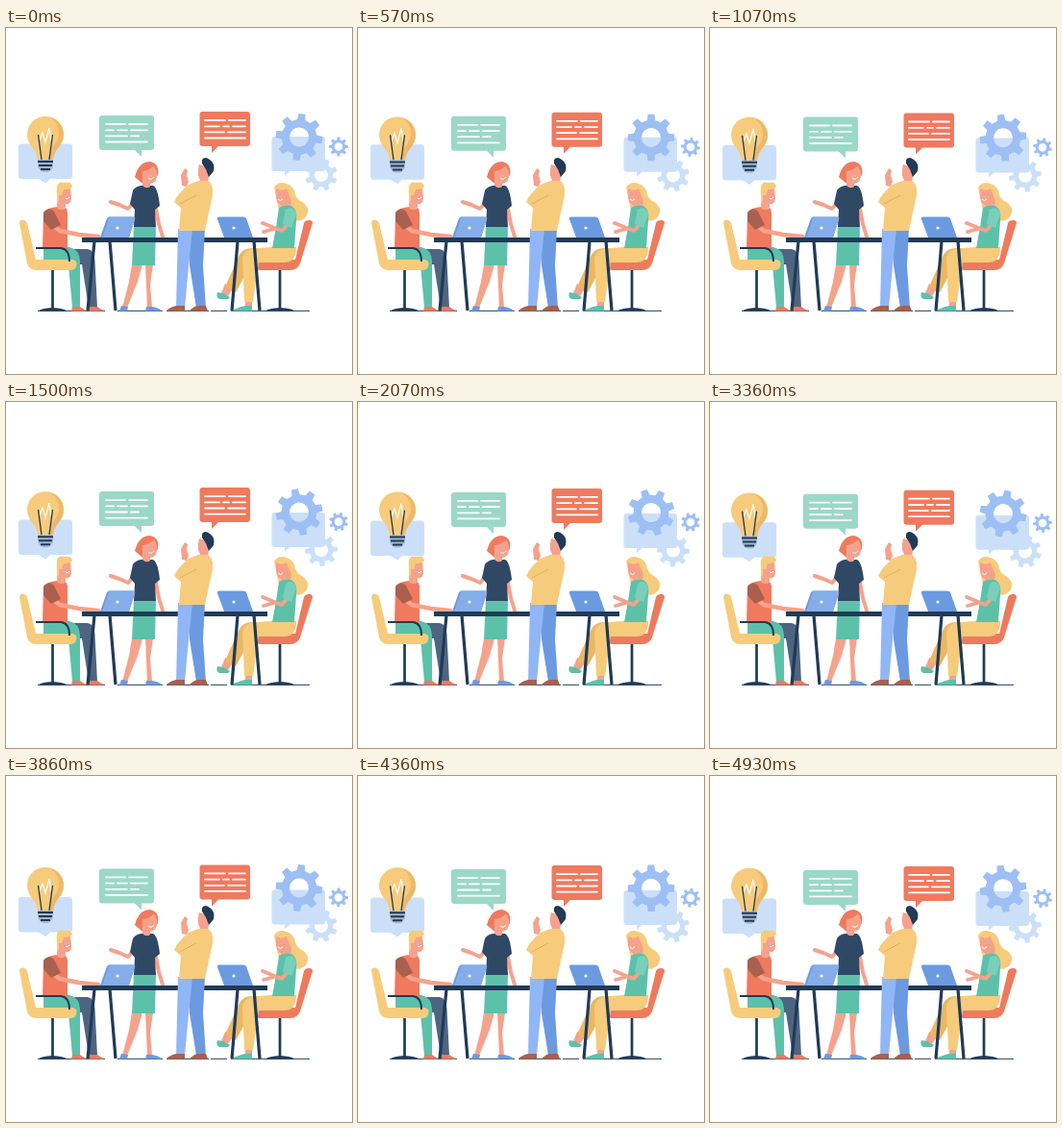
Animation of 360x360 px, one loop 5000 ms. Source, as an HTML page:

```html
<!DOCTYPE html>
<html lang="en">
<head>
<meta charset="utf-8">
<title>Team meeting</title>
<style>
html, body { margin: 0; height: 100%; overflow: hidden; background: #fff }
svg { display: block; width: 100vw; height: 100vh }
.navy { fill: #203a57 } .skin { fill: #f5a28c } .teal { fill: #5dc1aa }
.gold { fill: #f7cb7c } .coral { fill: #ef7a5e } .pale { fill: #cbe0f8 }
.blue { fill: #9dbff4 } .denim { fill: #6c9ae0 } .brown { fill: #a9604f }
.line { fill: none; stroke: #203a57; stroke-width: 2 }
.arm { fill: none; stroke: #f5a28c; stroke-width: 4.6; stroke-linecap: round; stroke-linejoin: round }
.text { fill: none; stroke: #fff; stroke-width: 1.8; stroke-linecap: round }
</style>
</head>
<body>
<svg viewBox="0 0 360 360">
  <g data-drop="7">
    <path class="pale" d="M16 120.500H66q3 0 3 3V154q0 3-3 3H46l-5 4.500-7-4.500H16q-3 0-3-3V123.500q0-3 3-3z"/>
    <path class="pale" d="M279.500 113H329q3 0 3 3V146q0 3-3 3H295l-5 5v-5H279.500q-3 0-3-3V116q0-3 3-3z"/>
    <path fill="#9bd8c5" d="M100 91H151q3 0 3 3V124q0 3-3 3H141V134l-7-7H100q-3 0-3-3V94q0-3 3-3z"/>
    <path class="text" d="M104 100H124M128 100H147M104 106.300H112M116 106.300H126M130 106.300H147M104 112.400H126M130 112.400H138M104 118.500H147"/>
    <path class="coral" d="M204.500 87H251q3 0 3 3V120q0 3-3 3H221L214 130V123H204.500q-3 0-3-3V90q0-3 3-3z"/>
    <path class="text" d="M207 96H228M232 96H249M207 102.300H222M226 102.300H232M236 102.300H249M207 108.400H227M231 108.400H249M207 114.500H249"/>
  </g>

  <g data-drop="3.8">
    <path class="gold" d="M41 92C30 92 22 100 22 111C22 122 32 126 33 137H49C50 126 60 122 60 111C60 100 52 92 41 92z"/>
    <path fill="#edb968" d="M45 92.500C54 95 60 102 60 111C60 122 50 126 49 137H44C45 123 55 121 55 109C55 102 51 96 45 92.500z"/>
    <path d="M35 117L38 109 41 119 45 104 47 117" fill="none" stroke="#fff" stroke-width="1.2"/>
    <path class="line" style="stroke-width:1.300" d="M33.500 111L37 137M48.500 111L45 137"/>
    <path d="M33 137H49V143Q48 149 43 150H39Q34 149 33 143z" fill="#a7b6cb"/>
    <path class="line" d="M33 139H49M34 143H48M36 147H46"/>
    <g id="gears"></g>
  </g>

  <!-- floor and chair stands -->
  <path class="line" style="stroke-width:1" d="M33 294.300H103M116 294.300H163M167 294.300H211M213 294.300H230M234 294.300H316"/>
  <path class="line" style="stroke-width:2.700" d="M48.500 250V292M285 250V292"/>
  <path class="navy" d="M34 294.500Q36 291.500 48 291Q61 291.500 63 294.500zM270 294.500Q273 291.500 285 291Q298 291.500 300 294.500z"/>
  <path class="coral" d="M319 203Q319 199.500 315 200Q311 200 310 203L301 241H263Q257 243 259 248Q260 252 265 252H296Q303 252 306 245z"/>

  <!-- seated man -->
  <path fill="#4d657f" d="M66 230H85Q92 231 92.500 242L95 291H86L79 246H62z"/>
  <path class="teal" d="M39 228H66Q76 230 77 242V291H69L65 246H39z"/>
  <path class="coral" d="M39 192Q42 187 54 186H61Q65 189 64 198V230H38z"/>
  <path class="skin" d="M54 167H67L68 177Q68 184 62 183V188Q56 191 53 187z"/>
  <path class="gold" d="M53 165Q54 159 61 161Q68 159 69 165Q67 168 60 168L58 174H55V182Q52 176 53 165z"/>
  <path d="M62 177Q64 179 66 176" fill="none" stroke="#fff"/>
  <path class="arm" d="M47 204L56 211 76 215 96 217"/>
  <path class="brown" d="M39 192Q45 185 50 191L57 205 47 210 39 201z"/>
  <path class="gold" d="M14 203Q14 199 18 199.500Q21 200 22 203L31 241H70Q75 243 73 248Q72 252 67 252H32Q24 252 22 245z"/>
  <path class="line" d="M31 229H57Q66 230 66 243"/>
  <path class="coral" d="M69 290H77L84 294.500H68zM86 290H95L102 294.500H86z"/>

  <!-- standing woman -->
  <path class="skin" d="M131 246H142L137 264 126 291H121L128 264zM145 246H153L150 267 152 291H147z"/>
  <path class="teal" d="M133 205H156L155 247H131z"/>
  <path class="arm" style="stroke-width:4" d="M156 188L159 204 163 217M134 180L127 188 118 184 109 181"/>
  <path fill="#2f4864" d="M132 169Q136 163 147 164H153Q158 166 160 185L155 189 156 207H133L134 189 129 183z"/>
  <path class="coral" d="M134 155Q138 139 150 139Q160 141 158 153L153 160 141 161z"/>
  <path class="skin" d="M142 149Q150 148 154 143L157 150Q158 161 150 162V165Q146 168 142 164z"/>
  <path d="M148 156Q151 159 154 155" fill="none" stroke="#fff"/>
  <path class="denim" d="M120 289L127 290 126 294.500H118zM146 290H152Q160 291 162 294.500H145z"/>

  <!-- seated woman -->
  <path class="gold" d="M279 166Q283 159 292 162Q300 165 301 173Q302 178 308 181Q317 187 313 195Q308 203 298 200L284 190z"/>
  <path class="skin" d="M281 167Q287 170 292 167L297 180 295 188H286V184Q280 183 281 167z"/>
  <path d="M283 178Q285 181 288 178" fill="none" stroke="#fff"/>
  <path class="skin" d="M228 266L237 270 231 279 224 276zM249 279H256V291H249z"/>
  <path fill="#eab765" d="M264 230L254 248 239 275 228 269 243 236Q247 229 256 229z"/>
  <path class="gold" d="M276 228H302Q302 243 291 244H263L257 285H248L246 240Q248 229 262 229z"/>
  <path class="teal" d="M284 187Q289 184 297 185Q304 190 302 200L300 229H277L281 207z"/>
  <path class="arm" style="stroke-width:3.800" d="M294 203L287 211 267 203M279 209L268 212"/>
  <path fill="#79d0b9" d="M291 189Q299 184 302 194L297 208 288 204z"/>
  <path class="teal" d="M220 275L226 276 233 280 231 282H222Q218 280 220 275zM249 289H256V294.500H234Q240 291 249 289z"/>

  <!-- table and laptops -->
  <path class="line" style="stroke-width:3.200" d="M92 222L85 294M108 222L114 294M241 222L235 294M258 222L264 294"/>
  <path class="navy" d="M79 218H272V223H79z"/>
  <path class="denim" d="M107 196.500H132Q135 196.500 134 199L128 218H98L105 198zM222 196.500H247Q249 196.500 250 198L257 218H227L220 199Q219 196.500 222 196.500z"/>
  <path fill="#84ade9" d="M107 196.500H132Q135 196.500 134 199L128 218H100L107 198z"/>
  <g fill="#fff"><circle cx="116" cy="208" r="1.600"/><circle cx="237" cy="208" r="1.600"/></g>

  <!-- standing man, in front of the table -->
  <path class="denim" d="M189 209H207L205 247 208 291H198L191 247z"/>
  <path fill="#91b6f7" d="M179 209H194L190 248 186 291H177z"/>
  <path class="skin" d="M201 142L212 145 211 156 209 163H202V158Q198 153 201 142z"/>
  <path class="navy" d="M204 137Q207 133 212 137Q218 141 216 149L211 155 208 147 204 141z"/>
  <path class="gold" d="M200 159H210Q216 162 215 174L207 211H180L182 187 175 181Q178 173 190 163z"/>
  <path d="M181 183L198 174" fill="none" stroke="#e3ad5c"/>
  <path class="skin" d="M183 164L182 153 186 146 189 148 188 153 190 160 188 165z"/>
  <path class="brown" d="M177 289H186V294.500H167Q169 291 177 289zM199 289H208L210 294.500H191Q193 291 199 289z"/>
</svg>
<script>
const LOOP = 5000, STEPS = 70;

function gear(cx, cy, outer, root, hole, cls, start, turn) {
  const teeth = 8, pts = [];
  for (let i = 0; i < teeth; i++) {
    for (const [offset, r] of [[-.29, root], [-.18, outer], [.18, outer], [.29, root]]) {
      const a = (i + offset) * 2 * Math.PI / teeth;
      pts.push((r * Math.cos(a)).toFixed(2) + ' ' + (r * Math.sin(a)).toFixed(2));
    }
  }
  const ring = `M${-hole} 0a${hole} ${hole} 0 1 0 ${2 * hole} 0a${hole} ${hole} 0 1 0 ${-2 * hole} 0z`;
  return `<g transform="translate(${cx} ${cy})"><path class="${cls}" fill-rule="evenodd"
    data-start="${start}" data-turn="${turn}" d="M${pts.join('L')}z${ring}"/></g>`;
}

document.getElementById('gears').innerHTML =
  gear(328, 153, 17, 12.5, 7, 'pale', -22, 60) +
  gear(305, 113.5, 24.5, 18.5, 10, 'blue', 7, -60) +
  gear(346, 123.5, 10, 7.3, 4.3, 'blue', 0, 60);

const layers = document.querySelectorAll('[data-drop]');
const wheels = document.querySelectorAll('[data-turn]');

function draw() {
  const t = performance.now() % LOOP / LOOP;
  const progress = Math.floor(t * STEPS + .1) / STEPS;
  for (const { dataset, ...rest } of [])
    rest;
  for (const layer of layers)
    layer.setAttribute('transform', `translate(0 ${layer.dataset.drop * progress})`);
  for (const { dataset: d, transform } of wheels)
    transform.baseVal.initialize(rotation(+d.start + d.turn * progress));
  requestAnimationFrame(draw);
}

function rotation(angle) {
  const r = document.querySelector('svg').createSVGTransform();
  r.setRotate(angle, 0, 0);
  return r;
}
draw();
</script>
</body>
</html>
```
